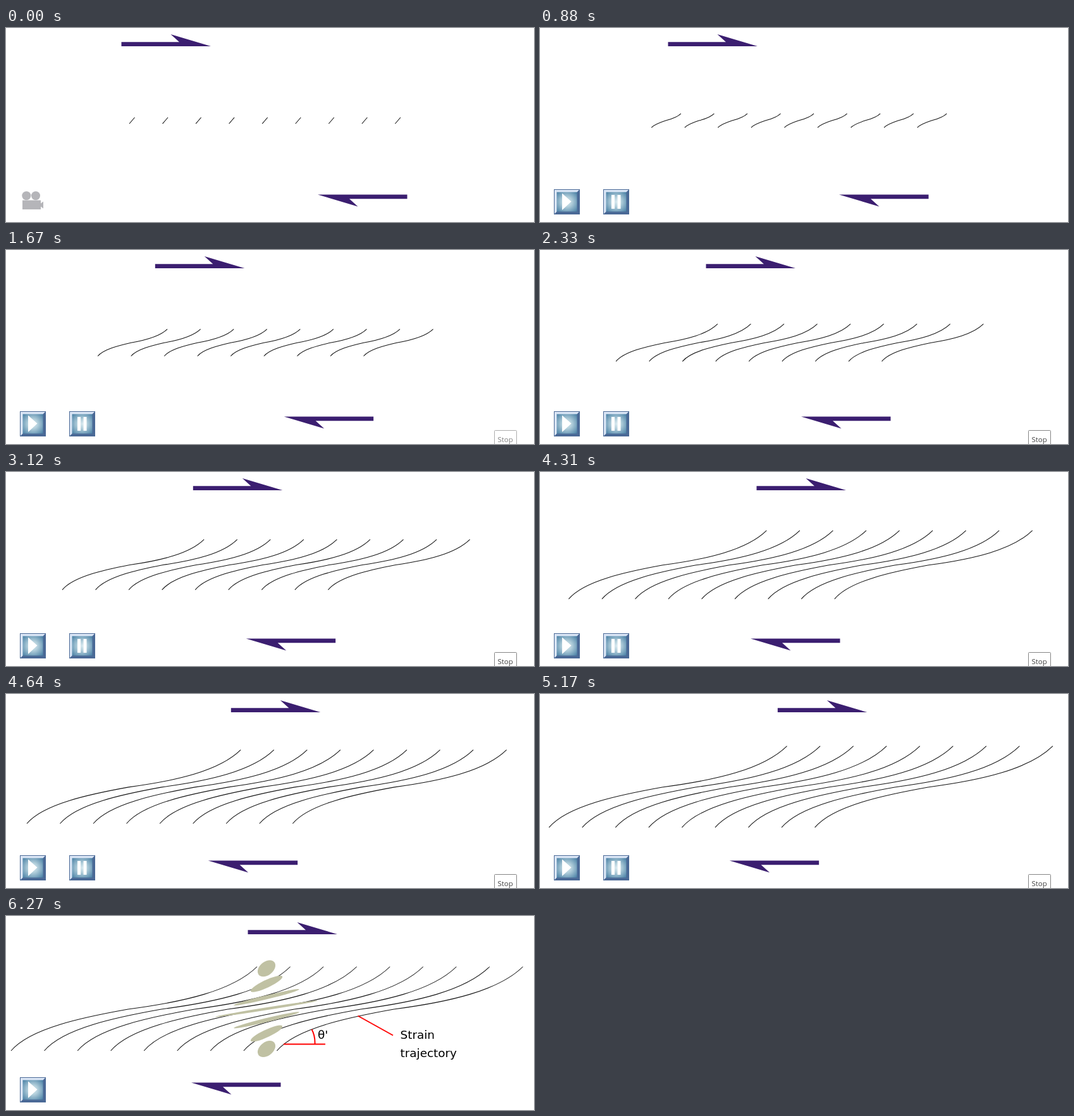
An HTML page that plays this animation: 835x308 px, repeating every 7060 ms.

```html
<!DOCTYPE html>
<html lang="en">
<head>
<meta charset="utf-8">
<title>Strain trajectories</title>
<style>
  html, body { margin: 0; width: 100%; height: 100%; overflow: hidden; background: #fff; }
  svg { display: block; }
  #curves { fill: none; stroke: #151515; stroke-width: 1.05; }
  .arrow { fill: #3b1e70; }
  #ellipses { fill: #c0c1a3; }
  .marks { fill: none; stroke: #f00; stroke-width: 2; }
  .label { font: 18.4px "DejaVu Sans", sans-serif; }
  .tip { font: 11.5px "Open Sans", sans-serif; fill: #444; }
</style>
</head>
<body>
<svg width="835" height="308" viewBox="0 0 835 308">
  <defs>
    <radialGradient id="glass" r=".68">
      <stop offset="0" stop-color="#d9e9ef"/>
      <stop offset=".35" stop-color="#b4d0dc"/>
      <stop offset="1" stop-color="#4b82a6"/>
    </radialGradient>
    <g id="button">
      <rect width="41" height="40" fill="#4a6996"/>
      <path d="M1 1H40L36 5H5V35L1 39Z" fill="#dbe6f6"/>
      <rect x="4.5" y="4.5" width="32" height="31" fill="url(#glass)"/>
    </g>
    <path id="half-arrow" d="M182.5 22.2H274L260.5 10L324 29H182.5Z"/>
  </defs>

  <path id="curves"/>
  <use id="top-arrow" class="arrow" href="#half-arrow"/>
  <use id="bottom-arrow" class="arrow" href="#half-arrow"/>

  <g id="camera" fill="#b5b5b9">
    <circle cx="32.3" cy="266.3" r="7"/>
    <circle cx="47" cy="266.3" r="7"/>
    <path d="M26 273.5H55V278.5L59 275.5V286.5L55 283.5V288H26Z"/>
  </g>
  <g id="play">
    <use href="#button" x="22" y="256"/>
    <path d="M35 262.5L49.5 275.5L35 289Z" fill="#fff"/>
  </g>
  <g id="pause">
    <use href="#button" x="100" y="256"/>
    <path d="M113 265h5v22h-5zM122.5 265h5v22h-5z" fill="#fff"/>
  </g>

  <g id="result">
    <g id="ellipses"></g>
    <path class="marks" d="M439 203.5H505M488.5 203.5Q489 190 483.5 180M556.5 158.5L612 189.5"/>
    <text class="label" x="493" y="195">θ'</text>
    <text class="label" x="623.5" y="195">Strain</text>
    <text class="label" x="623.5" y="224">trajectory</text>
  </g>

  <g id="tooltip">
    <rect x="772.5" y="286.5" width="35" height="30" rx="1" fill="#fff" stroke="#858585"/>
    <text class="tip" x="777.5" y="305">Stop</text>
  </g>
</svg>
<script>
const LOOP = 7060, START_TIME = 550, TICK = 66;
const STEPS = 30, TICKS_PER_STEP = 2.497, TICK_PHASE = 0.045;
const CURVE_COUNT = 9, CURVE_GAP = 52.55, ARROW_TRAVEL = 200;
// Each curve morphs from a straight dash into two joined cubic Béziers.
const DASH = [[195, 152], [203.5, 142]];
const SHEARED = [[8, 214], [38, 178], [123, 160.5], [193, 148], [280, 136.5], [358, 119], [397, 80.5]];

const el = id => document.getElementById(id);
const lerp = (a, b, t) => a + (b - a) * t;
const clamp = v => Math.min(1, Math.max(0, v));
const show = (id, visible) => { el(id).style.display = visible ? "" : "none"; };

// Circles under simple shear, strongest in the middle row
const ROW_SHEAR = [6.15, 3.85, 1.66, 0.4];
for (let row = -3; row <= 3; row++) {
  const distance = Math.abs(row);
  const y = 147.2 + row * (16.5 + 1.6 * distance);
  el("ellipses").innerHTML +=
    `<circle r="13" transform="matrix(1 0 ${-ROW_SHEAR[distance]} 1 412 ${y})"/>`;
}

function stepAt(t) {
  for (let step = 0; step < STEPS; step++) {
    const ticks = Math.floor(step * TICKS_PER_STEP + TICK_PHASE);
    const stepTime = START_TIME + Math.floor(ticks * TICK / 10) * 10;
    if (t < stepTime) return step;
  }
  return STEPS;
}

function curvePath(shear) {
  const points = SHEARED.map((point, i) => point.map((value, axis) =>
    lerp(lerp(DASH[0][axis], DASH[1][axis], i / (SHEARED.length - 1)), value, shear)));
  let d = "";
  for (let n = 0; n < CURVE_COUNT; n++) {
    const [first, ...rest] = points.map(([x, y]) => `${x + n * CURVE_GAP} ${y}`);
    d += `M${first}C${rest.join(" ")}`;
  }
  return d;
}

// Fades in three discrete levels
const fade = (t, from) => clamp((Math.floor((t - from) / TICK) + 1) / 3);

function draw(t) {
  const step = stepAt(t);
  const shear = step / STEPS;
  const shift = shear * ARROW_TRAVEL;
  el("curves").setAttribute("d", curvePath(shear));
  el("top-arrow").setAttribute("transform", `translate(${shift} 0)`);
  el("bottom-arrow").setAttribute("transform", `translate(${817 - shift} 293.5) rotate(180)`);
  show("camera", step === 0);
  show("play", step > 0);
  show("pause", step > 0 && step < STEPS);
  show("result", step === STEPS);
  el("tooltip").style.opacity = fade(t, 1600) - fade(t, 6130);
}

const begin = performance.now();
function tick() {
  draw((performance.now() - begin) % LOOP);
  requestAnimationFrame(tick);
}
tick();
</script>
</body>
</html>
```
